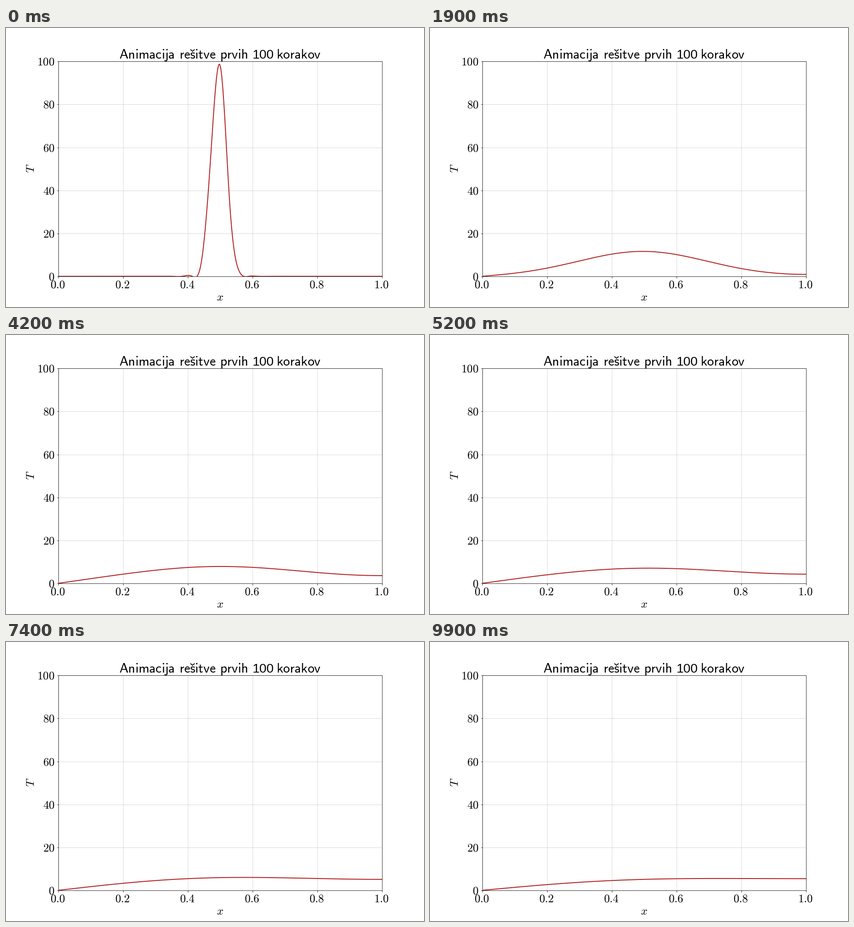
A matplotlib script that plays this animation: 917x611 px, repeating every 10 s.

```python
import numpy as np
import matplotlib.pyplot as plt
from matplotlib.animation import FuncAnimation
from matplotlib.lines import Line2D

W, H, DPI = 917, 611, 100
PX = 72 / DPI           # one pixel in points
STEPS = 100
N = 34                  # spline intervals on [0, 1]
TAU = 0.001015          # diffusivity times time step
CENTER, SIGMA = 0.4955, 0.0230

plt.rcParams["mathtext.fontset"] = "cm"


def basis(u):
    """Uniform cubic B-spline, unit spacing."""
    u = np.abs(u)
    inner = (4 - 6 * u**2 + 3 * u**3) / 6
    return np.where(u < 1, inner, np.clip(2 - u, 0, None)**3 / 6)


def tridiag(diag, off):
    """Zero value on the left, zero slope on the right."""
    m = diag * np.eye(N) + off * (np.eye(N, k=1) + np.eye(N, k=-1))
    m[-1, -2] *= 2
    return m


def solve():
    """Crank-Nicolson collocation; returns x and one profile per step."""
    knots = np.arange(1, N + 1) / N
    value = tridiag(4 / 6, 1 / 6)
    curve = tridiag(-2, 1) * N**2 * TAU / 2
    step = np.linalg.solve(value - curve, value + curve)
    start = 100 * np.exp(-(knots - CENTER)**2 / (2 * SIGMA**2))

    x = np.linspace(0, 1, 300)
    shape = basis(x[:, None] * N - np.arange(-1, N + 2))
    coef = np.linalg.solve(value, start)
    rows = []
    for _ in range(STEPS):
        full = np.concatenate([[-coef[0], 0], coef, [coef[-2]]])
        rows.append(shape @ full)
        coef = step @ coef
    return x, rows


fig = plt.figure(figsize=(W / DPI, H / DPI), dpi=DPI, facecolor="white")
ax = fig.add_axes([0.125, 0.11, 0.775, 0.77])
ax.set(xlim=(0, 1), ylim=(0, 100))
ax.set_xticks(np.linspace(0, 1, 6), labels=[])
ax.set_yticks(np.linspace(0, 100, 6), labels=[])
ax.tick_params(length=3.5 * PX, width=0.8 * PX)
ax.grid(color="#b0b0b0", alpha=0.6, linewidth=0.8 * PX)
for spine in ax.spines.values():
    spine.set_linewidth(0.8 * PX)


def label(x, y, s, size=25, ha="center", **kw):
    """Text with its baseline at pixel (x, y) from the top left."""
    return fig.text(x / W, 1 - y / H, s, fontsize=size * PX,
                    ha=ha, va="baseline", color="black", **kw)


def sans(*words):
    return "$" + r"\hspace{0.38}".join(rf"\mathsf{{{w}}}" for w in words) + "$"


for i in range(6):
    label(113.6 + i * 142.05, 570, rf"$\mathrm{{{i / 5:.1f}}}$")
    label(106.8, 552.3 - i * 94.1, rf"$\mathrm{{{20 * i}}}$", ha="right")
label(469.6, 597, "$x$")
label(61.5, 307.5, "$T$", rotation=90, rotation_mode="anchor")

# title; the math font has no sans digits, so the number is plain text
head = label(248.3, 67.3, sans("Animacija", "resitve", "prvih"), 29.65, "left")
label(564, 67.3, "100", 28.2, family="Liberation Sans")
label(690.8, 67.3, sans("korakov"), 29.65, "right")

# caron over the s
box = head.get_window_extent(fig.canvas.get_renderer())
cx = box.x0 + 0.57 * box.width
fig.add_artist(Line2D([(cx + d) / W for d in (-4, 0, 4)],
                      [1 - y / H for y in (47.6, 51, 47.6)],
                      color="black", linewidth=1.3, solid_joinstyle="miter"))

x, profiles = solve()
line, = ax.plot(x, profiles[0], color="firebrick", linewidth=2 * PX)


def update(i):
    line.set_ydata(profiles[i])
    return line,


anim = FuncAnimation(fig, update, frames=STEPS, interval=100,
                     repeat=True, repeat_delay=0)
plt.show()
```
